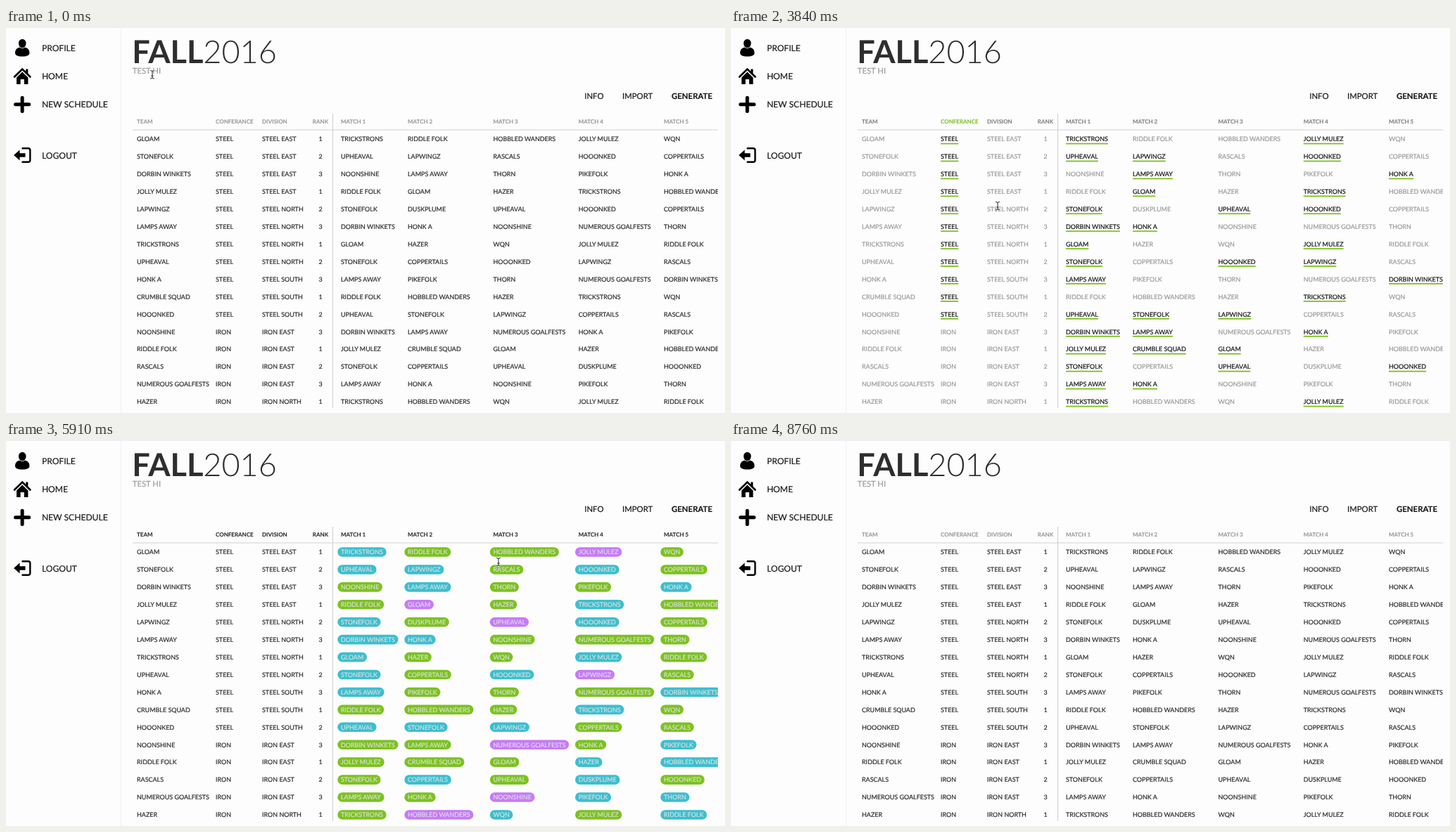
These frames come from a looping animation (1022x548 px, 9250 ms). An HTML page:

```html
<!DOCTYPE html>
<html lang="en">
<head>
<meta charset="utf-8">
<title>Schedule</title>
<style>
html, body { margin: 0; width: 100%; height: 100%; overflow: hidden; background: #fdfdfd; }
svg { display: block; width: 1022px; height: 548px; }
text {
  font-family: Lato, "Open Sans", sans-serif; text-rendering: geometricPrecision; white-space: pre;
  color: #1c1c1c; fill: currentColor; stroke: currentColor; stroke-width: .2px;
}
.title { font-size: 45.1px; color: #2e2e2e; stroke: none; }
.note { font-size: 11.3px; color: #9c9c9c; }
.menu { font-size: 12.1px; }
.tab { font-size: 11.4px; }
.head { font-size: 8px; font-weight: 700; stroke-width: .1px; }
.cell { font-size: 8.97px; }
</style>
</head>
<body>
<svg id="stage" viewBox="0 0 1022 548">
  <defs><clipPath id="frame"><rect x="180" y="120" width="832" height="421"/></clipPath></defs>
  <rect width="1022" height="548" fill="#fdfdfd"/>
  <path d="M163.500 0V548" stroke="#f0f0f0"/>
  <g fill="#000">
    <path d="M13 35.500C13 30.500 16 28.500 19.300 27.600C21.500 29.400 24.900 29.400 27.100 27.600C30.400 28.500 33.400 30.500 33.400 35.500C33.400 39 30 40.500 23.200 40.500S13 39 13 35.500Z"/>
    <ellipse cx="23.200" cy="22" rx="5.300" ry="6.200"/>
    <path d="M15 70.500L23.200 62.500L31.400 70.500V80H25.800V73H20.600V80H15Z"/>
    <path d="M28.200 58.500H31.300V65H28.200Z"/>
    <path d="M12 69.500L23.200 58.500L34.400 69.500" fill="none" stroke="#000" stroke-width="2.600" stroke-linecap="round"/>
    <path d="M23.100 99.200V118.400M13.500 108.800H32.700" stroke="#000" stroke-width="5" stroke-linecap="round"/>
    <path d="M11 181L19.500 173.500V178.300H27.500V183.700H19.500V188.500Z"/>
    <path d="M22.500 171.200H31.500Q34.300 171.200 34.300 174V188Q34.300 190.800 31.500 190.800H22.500" fill="none" stroke="#000" stroke-width="2.400"/>
  </g>
  <text class="menu" x="50.900" y="32.900">PROFILE</text>
  <text class="menu" x="50.900" y="73.100">HOME</text>
  <text class="menu" x="50.900" y="113.200">NEW SCHEDULE</text>
  <text class="menu" x="50.900" y="185.500">LOGOUT</text>
  <text class="title" x="179.300" y="50.200"><tspan font-weight="700">FALL</tspan><tspan font-weight="300">2016</tspan></text>
  <text class="note" x="179.800" y="65.200">TEST HI</text>
  <text class="tab" x="822.200" y="101.300">INFO</text>
  <text class="tab" x="876" y="101.300">IMPORT</text>
  <text class="tab" x="946" y="101.300" font-weight="700">GENERATE</text>
  <g id="table" clip-path="url(#frame)"></g>
  <path d="M180 145H1012M464.500 122V541" stroke="#d2d2d2" stroke-width="1.200" fill="none"/>
  <path id="status" d="M0 545.300H336.500Q339.500 545.300 339.500 548H0Z" fill="#35383d"/>
  <g id="cursor">
    <g id="beam" fill="none" stroke-linecap="round">
      <path d="M-2.500 -5.500Q0 -5.500 0 -4Q0 -5.500 2.500 -5.500M0 -4V4.500M-2.500 6Q0 6 0 4.500Q0 6 2.500 6M-1.300 2H1.300" stroke="#fff" stroke-width="2.200"/>
      <path d="M-2.500 -5.500Q0 -5.500 0 -4Q0 -5.500 2.500 -5.500M0 -4V4.500M-2.500 6Q0 6 0 4.500Q0 6 2.500 6M-1.300 2H1.300" stroke="#222" stroke-width="1"/>
    </g>
    <path id="arrow" d="M0 0V11L2.600 8.700L4.400 12.800L6.300 12L4.500 8H8Z" fill="#000" stroke="#fff" stroke-width=".8"/>
    <path id="hand" d="M0 1Q1.300 -1 2.300 1L3.500 4.500Q5 3.500 5.500 5Q7 4.200 7.500 5.700Q9 5.500 9 7.500L8 13H1.500L-3.500 8Q-3.500 6 -1.500 6.800L1 8.500Z" fill="#fff" stroke="#111" stroke-width="1.100" stroke-linejoin="round"/>
  </g>
</svg>
<script>
const LOOP = 9250;
const RED = "#f03a1e", GREEN = "#7cc220", CYAN = "#3bbfcf", PURPLE = "#c67af8";
const TINT = { team: RED, conf: GREEN, div: PURPLE, rank: CYAN };
const INK = "#2b2b2b", DIM = "#989898";

const NAMES = ["GLOAM", "STONEFOLK", "DORBIN WINKETS", "JOLLY MULEZ", "LAPWINGZ", "LAMPS AWAY",
  "TRICKSTRONS", "UPHEAVAL", "HONK A", "CRUMBLE SQUAD", "HOOONKED", "NOONSHINE", "RIDDLE FOLK",
  "RASCALS", "NUMEROUS GOALFESTS", "HAZER", "HOBBLED WANDERS", "WQN", "THORN", "PIKEFOLK",
  "COPPERTAILS", "DUSKPLUME"];
const AREAS = "EEEENNNNSSSEEEENNSSSSS";
const AREA_NAMES = { E: "EAST", N: "NORTH", S: "SOUTH" };
// Five opponents per row, one letter per team.
const MATCHES = "gmqdr henku lfsti mapgq bvhku cilos aprdm buken ftsoc mqpgr hbeun cfoit djapq buhvk filts gqrdm".split(" ");

const teams = NAMES.map((team, i) => {
  const conf = i < 11 ? "STEEL" : "IRON";
  return { team, conf, div: conf + " " + AREA_NAMES[AREAS[i]], rank: i % 3 + 1 };
});
const COLUMNS = [["team", "TEAM", 186], ["conf", "CONFERANCE", 298], ["div", "DIVISION", 364], ["rank", "RANK", 447],
  ...[476, 571, 692.5, 813.7, 935].map((x, i) => ["match", "MATCH " + (i + 1), x])];

const $ = id => document.getElementById(id);
const table = $("table");

function add(tag, attrs, content = "") {
  const node = document.createElementNS("http://www.w3.org/2000/svg", tag);
  set(node, attrs);
  node.textContent = content;
  table.append(node);
  return node;
}
function set(node, attrs) {
  for (const key in attrs) node.setAttribute(key, attrs[key]);
}

const heads = COLUMNS.map(([kind, label, x]) => ({
  kind,
  node: add("text", { class: "head", x, y: 135.9, "text-anchor": kind === "rank" ? "middle" : "start" }, label)
}));

const cells = [];
MATCHES.forEach((opponents, r) => {
  const row = teams[r], cy = 158 + 24.93 * r;
  COLUMNS.forEach(([kind, , x], c) => {
    const subject = kind === "match" ? teams[opponents.charCodeAt(c - 4) - 97] : row;
    const isRank = kind === "rank";
    const back = isRank ? add("circle", { cx: x, cy, r: 9.3, fill: CYAN })
      : add("rect", { x: x - 4.7, y: cy - 6.8, height: 13.6, rx: 6.8 });
    const text = add("text", { class: "cell", x, y: cy + 3.3, "text-anchor": isRank ? "middle" : "start" },
      subject[kind === "match" ? "team" : kind]);
    const line = add("rect", { y: cy + 5.7, height: 1.8 });
    const width = text.getComputedTextLength();
    if (!isRank) {
      const pill = subject.div === row.div ? PURPLE : subject.conf === row.conf ? CYAN : GREEN;
      set(back, { width: width + 9.4, fill: pill });
    }
    cells.push({ kind, x, row, subject, back, text, line, width });
  });
});

// [start, end, column, value]
const SCENES = [
  [1400, 1700, "team", NAMES[0]], [1700, 1900, "team", NAMES[2]], [1900, 2080, "team", NAMES[4]],
  [2080, 2400, "team", NAMES[5]], [2400, 2890, "team", NAMES[6]], [2890, 3300, "team", NAMES[7]],
  [3300, 4060, "conf", "STEEL"], [4060, 4780, "div", "STEEL NORTH"], [4780, 5536, "rank", 1],
  [5536, 6550, "pills"]
];

// [time, x, y, shape]; each shape lasts until the next point.
const PATH = [
  [0, 208, 66, "beam"], [150, 185, 60, "arrow"], [400, 80, 32, "hand"], [650, 78, 72, "hand"],
  [880, 90, 110, "arrow"], [1160, 195, 146, "arrow"], [1270, 214, 155, "arrow"], [1400, 215, 165, "beam"],
  [2080, 217, 280, "beam"], [2630, 217, 303, "beam"], [3000, 222, 330, "beam"], [3340, 305, 300, "beam"],
  [3840, 379, 253, "beam"], [4480, 392, 240, "beam"], [4800, 446, 222, "arrow"], [5300, 455, 210, "arrow"],
  [5490, 500, 195, "arrow"], [5640, 545, 188, "beam"], [5910, 700, 172, "beam"], [6260, 870, 122, "arrow"],
  [6430, 903, 98, "hand"], [7050, 906, 98, "hand"], [7400, 972, 97, "hand"], [7750, 840, 96, "hand"],
  [7900, 780, 80, "arrow"], [8060, 665, 58, "arrow"], [8640, 208, 66, "arrow"], [LOOP, 208, 66, "arrow"]
];

// Picture updates: [start, number of equal holds until the next entry].
const HOLDS = [[0, 1], [90, 7], [1040, 1], [1160, 1], [1270, 5], [2080, 1], [2280, 2], [2630, 4], [3160, 1],
  [3340, 3], [3840, 3], [4340, 1], [4480, 6], [5490, 1], [5640, 1], [5910, 4], [6430, 3], [6940, 1],
  [7050, 8], [8060, 1], [8180, 5], [8760, 1], [LOOP, 1]];

function hold(t) {
  const i = HOLDS.findIndex(h => h[0] > t) - 1;
  const [start, count] = HOLDS[i], step = (HOLDS[i + 1][0] - start) / count;
  return start + Math.floor((t - start) / step) * step;
}

function drawCursor(t) {
  const i = PATH.findIndex(p => p[0] > t) - 1;
  const [t0, x0, y0, shape] = PATH[i], [t1, x1, y1] = PATH[i + 1];
  const k = (t - t0) / (t1 - t0);
  set($("cursor"), {
    transform: `translate(${x0 + (x1 - x0) * k} ${y0 + (y1 - y0) * k})`,
    visibility: t < 8750 ? "visible" : "hidden"
  });
  for (const id of ["beam", "arrow", "hand"]) $(id).style.display = id === shape ? "" : "none";
}

function drawTable(t) {
  const [start, end, mode, value] = SCENES.find(s => t >= s[0] && t < s[1]) || [0, 0, "none"];
  const amount = Math.max(0, Math.min(1, (t - start) / 200, (end - t) / 200));
  const pills = mode === "pills", tint = TINT[mode];
  const headInk = pills ? INK : tint ? "#808080" : "#999";
  for (const { kind, node } of heads) node.style.color = kind === mode ? tint : headInk;

  const gray = Math.round(43 + 212 * amount * 0.85);
  for (const { kind, x, row, subject, back, text, line, width } of cells) {
    const isMatch = kind === "match", owner = mode === "rank" ? row : subject;
    const lit = tint && (isMatch || kind === mode) && owner[mode] === value;
    const circled = lit && kind === "rank";
    const lineWidth = lit && !circled ? width * amount : 0;
    let ink = tint ? (lit ? "#141414" : DIM) : INK;
    if (circled) ink = "#fff";
    if (pills && isMatch) ink = `rgb(${gray},${gray},${gray})`;
    text.style.color = ink;
    back.setAttribute("opacity", circled ? 1 : pills && isMatch ? amount : 0);
    set(line, { x: x + (width - lineWidth) / 2, width: lineWidth, fill: tint || "none" });
  }
}

function draw(now) {
  const t = hold(now % LOOP);
  drawTable(t);
  drawCursor(t);
  $("status").style.display = t >= 400 && t < 1400 ? "" : "none";
}

const began = performance.now();
function tick() {
  draw(performance.now() - began);
  requestAnimationFrame(tick);
}
tick();
</script>
</body>
</html>
```
